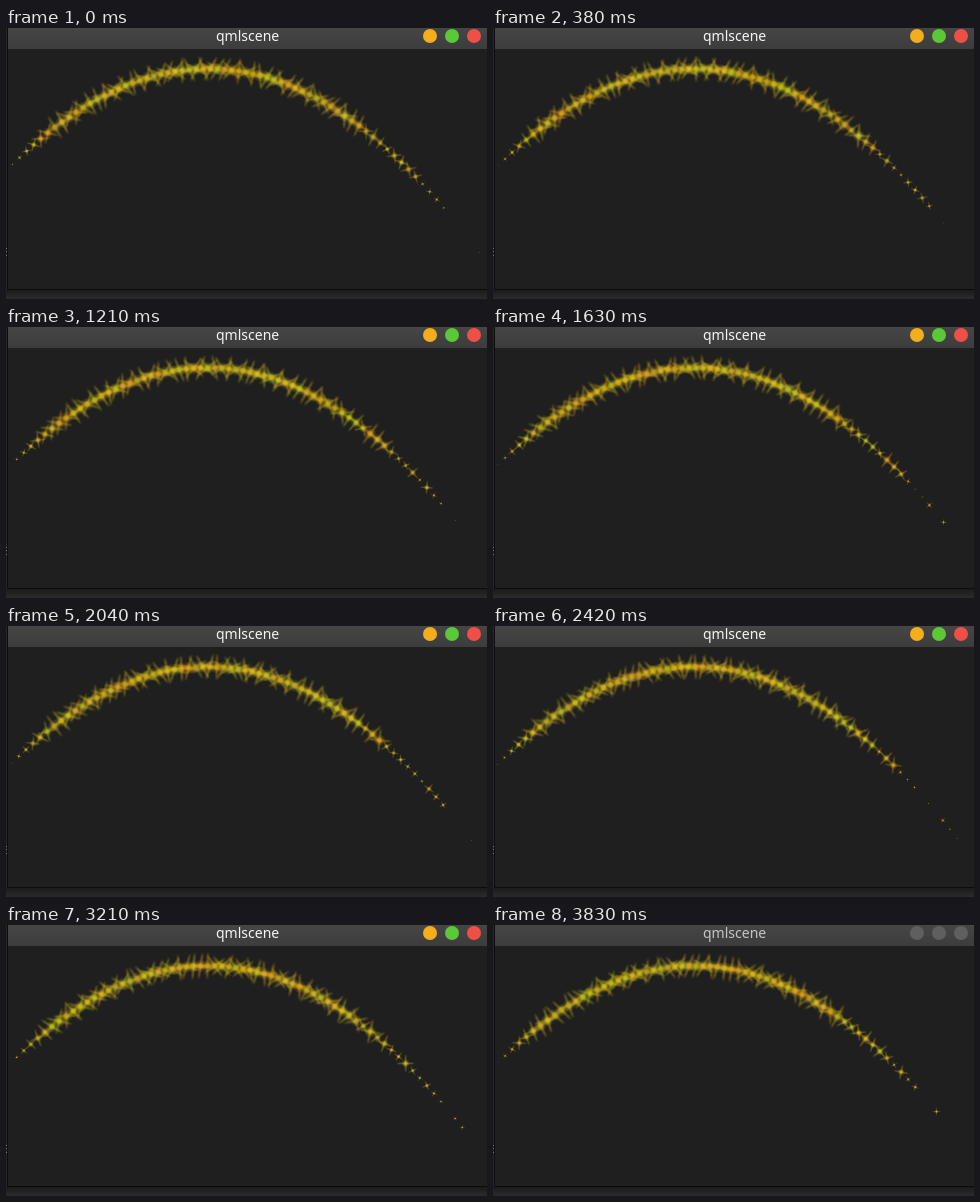
Recreate the animation shown at these times as an HTML page with a canvas. Size 481x271 px, loop 3.87 s.

```html
<!DOCTYPE html>
<html lang="en">
<head>
<meta charset="utf-8">
<style>
  html, body { margin: 0; width: 100%; height: 100%; overflow: hidden; background: #282828; }
  canvas { display: block; }
</style>
</head>
<body>
<canvas id="stage" width="481" height="271"></canvas>
<script>
const ctx = document.getElementById('stage').getContext('2d');
const LOOP = 3870, BLUR_AT = 3830;
const SPEED = 100 * Math.SQRT1_2, GRAVITY = 25;   // px/s, px/s²
const INTERVAL = 0.1, PHASE = 0.0626;             // seconds between births
const ORIGIN = { x: 2, y: 140.8 };

const clamp = (v, lo, hi) => Math.min(hi, Math.max(lo, v));

function random(n, salt) {
  const v = Math.sin(n * 127.1 + salt * 311.7) * 43758.5453;
  return v - Math.floor(v);
}

function rect(color, x, y, w, h) {
  ctx.fillStyle = color;
  ctx.fillRect(x, y, w, h);
}

function disc(color, x, y, r) {
  ctx.fillStyle = color;
  ctx.beginPath();
  ctx.arc(x, y, r, 0, 2 * Math.PI);
  ctx.fill();
}

function verticalGradient(y0, y1, from, to) {
  const g = ctx.createLinearGradient(0, y0, 0, y1);
  g.addColorStop(0, from);
  g.addColorStop(1, to);
  return g;
}

function glow(rgb, radius, stops) {
  const g = ctx.createRadialGradient(0, 0, 0, 0, 0, radius);
  for (const [at, alpha] of stops) g.addColorStop(at, `rgba(${rgb},${alpha})`);
  return g;
}

function drawWindow(active) {
  rect('#282828', 0, 0, 481, 271);
  rect(verticalGradient(262, 271, '#1b1b1b', '#2b2b2b'), 0, 262, 481, 9);
  rect('#0c0c0c', 1, 0, 480, 262);
  rect('#1f1f1f', 2, 21, 479, 240);
  rect(verticalGradient(0, 21, '#464646', '#3c3c3c'), 2, 0, 479, 21);
  for (const y of [220, 223, 227]) rect('#777', 0, y, 1, 1);

  ctx.font = '14px "Noto Sans", sans-serif';
  ctx.fillStyle = active ? '#f4f4f4' : '#c4c4c4';
  ctx.fillText('qmlscene', 210, 13);
  ['#f5ae1b', '#5ac837', '#ee5048'].forEach((color, i) =>
    disc(active ? color : '#5f5f5f', 424 + 22 * i, 8, 7));
}

function drawStar(n, age) {
  const life = 6.4 + 0.4 * (2 * random(n, 1) - 1);
  const t = age / life;
  if (t <= 0 || t >= 1) return;
  const scale = Math.min(t * 10, 1) * (1 - clamp((t - 0.75) * 4, 0, 1));
  const rgb = [
    185 + 45 * random(n, 2),
    160 + 38 * random(n, 3),
    15 + 20 * random(n, 4)
  ].map(Math.round).join();

  ctx.save();
  ctx.translate(ORIGIN.x + SPEED * age,
                ORIGIN.y - SPEED * age + GRAVITY * age * age / 2);
  ctx.scale(scale, scale);
  ctx.rotate(random(n, 5) * Math.PI / 2);
  // Overlaid strips of growing width give each ray a soft edge.
  const ray = glow(rgb, 14, [[0, 0.15], [0.65, 0.12], [1, 0]]);
  for (const width of [1.2, 2.4, 3.6]) {
    rect(ray, -14, -width / 2, 28, width);
    rect(ray, -width / 2, -14, width, 28);
  }
  disc(glow(rgb, 6.5, [[0, 0.95], [0.3, 0.75], [0.6, 0.25], [1, 0]]), 0, 0, 6.5);
  ctx.restore();
}

// The stream stalls briefly and resumes slightly behind.
const streamTime = ms => (ms < 630 ? Math.min(ms, 380) : ms - 50) / 1000;

function draw(now) {
  const ms = now % LOOP;
  drawWindow(ms < BLUR_AT);
  ctx.save();
  ctx.beginPath();
  ctx.rect(2, 21, 479, 240);
  ctx.clip();
  const time = streamTime(ms) + PHASE;
  const newest = Math.floor(time / INTERVAL);
  for (let n = newest - 68; n <= newest; n++) drawStar(n, time - n * INTERVAL);
  ctx.restore();
  requestAnimationFrame(draw);
}
requestAnimationFrame(draw);
</script>
</body>
</html>
```
